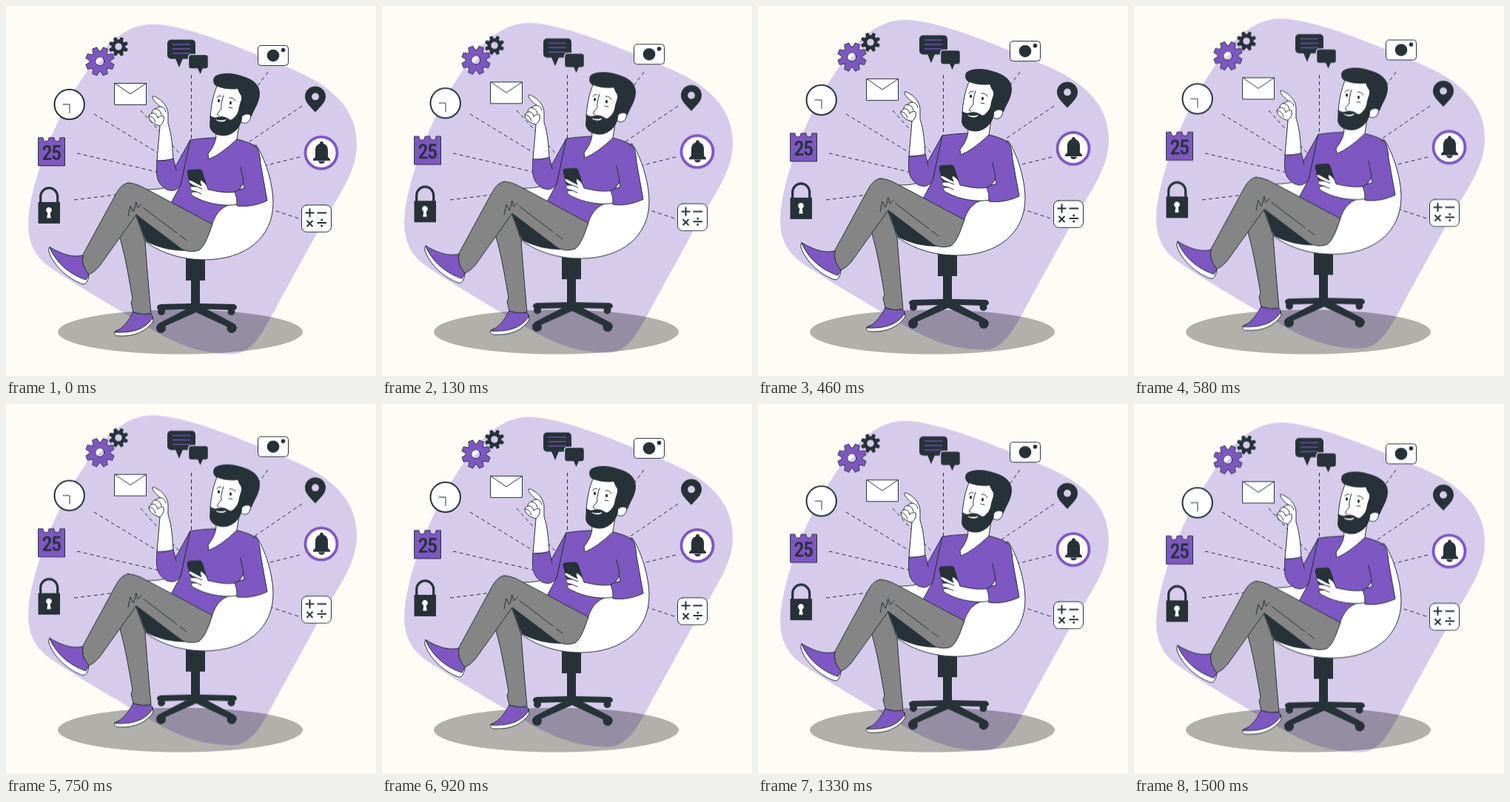
Recreate the animation shown at these times as an HTML page without scripts. Size 500 by 500 pixels, loop 1.54 s.

```html
<!DOCTYPE html>
<html lang="en">
<head>
<meta charset="utf-8">
<title>Relaxed multitasking</title>
<style>
  :root { --ink: #263238; --purple: #7e57c2; --lilac: #d6cbeb; --grey: #858585; }
  html, body { margin: 0; width: 100%; height: 100%; overflow: hidden; background: #fffcf5; }
  svg { display: block; width: 100%; height: 100%; }
  .float { animation: float 1540ms linear -35ms infinite; }
  @keyframes float {
    0%, 100% { transform: translateY(.4px); }
    50% { transform: translateY(-9.6px); }
  }
  .line { stroke: var(--ink); stroke-width: 1; stroke-linejoin: round; stroke-linecap: round; }
  .ink { fill: var(--ink); }
  .purple { fill: var(--purple); }
  .lilac { fill: var(--lilac); }
  .grey { fill: var(--grey); }
  .white { fill: #fff; }
  .none { fill: none; }
  .dashes { fill: none; stroke: var(--ink); stroke-width: 1; stroke-dasharray: 5 4; }
  .date { font: 500 28px "Roboto Condensed", Roboto, sans-serif; letter-spacing: -1.5px; text-anchor: middle; }
</style>
</head>
<body>
<svg viewBox="0 0 500 500">
  <defs>
    <g id="gear">
      <circle r="13.5"/>
      <g id="teeth"><path d="M-4 -13L-2.900 -19H2.900L4 -13V13L2.900 19H-2.900L-4 13Z"/><path d="M-13 -4L-19 -2.900V2.900L-13 4H13L19 2.900V-2.900L13 -4Z"/></g>
      <use href="#teeth" transform="rotate(45)"/>
    </g>
  </defs>

  <path class="float lilac" d="M200 24.500C250 27 325 60 378 82C445 108 474 142 474 187C474 225 450 255 424 300L370 398C350 435 335 471 305 470.500C270 470 240 462 200 439C150 409 95 378 58 352C36 336 30 315 30 295C30 250 60 170 88 122C120 70 150 24.500 200 24.500Z"/>

  <path class="dashes" d="M250.500 93V185M354 89L330 122M400 135L325 186M397 204L345 217M395 287L350 272M119 146L206 199M96 199L212 226M92 262L165 253M182 141L237 202"/>

  <ellipse cx="235.500" cy="440.500" rx="165.500" ry="30" opacity=".3"/>

  <g class="float">
    <!-- chair -->
    <g class="ink">
      <path d="M243 341H269V371H262V402L308 403Q312 404 312 408Q311 411 306 411L272 410L304 427Q312 430 312 436L302 435L257 414L212 434L203 436Q203 430 210 427L243 410L209 411Q204 411 204 407Q204 404 209 403L250 402V371H243Z"/>
      <circle cx="209.500" cy="435.500" r="6.500"/><circle cx="305" cy="435.500" r="6.500"/>
      <circle cx="210" cy="413" r="5"/><circle cx="304.500" cy="413" r="5"/>
    </g>
    <path class="white line" d="M338 188C350 205 361 240 361 266C361 312 325 343 268 343C235 343 205 332 187 317L176 248C215 249 223 245 238 232Z"/>

    <!-- back leg -->
    <path class="ink" d="M175 281L189 318C205 327 225 331 242 331Z"/>
    <path class="grey line" d="M175 283L152 307C160 333 164 355 171 396L169 401L172 414Q183 418 196 416C193 382 190 348 188 318Z"/>
    <path class="white line" d="M147 440C145 444 148 446 153 446C175 447 190 439 199 426L198 419Z"/>
    <path class="purple line" d="M172 414Q183 418 195 416Q199 418 198 422C188 436 174 442 147 441C159 435 165 426 172 414Z"/>

    <!-- torso -->
    <path class="purple line" d="M249 181Q262 179 281 178L312 180Q329 184 338 190L345 230L321 238L320 266L311 267C293 269 284 278 278 297L221 270L236 242Z"/>

    <!-- front leg -->
    <path class="grey line" d="M165 239C156 241 152 248 148 255L104 336Q101 351 112 363Q119 360 126 352L176 282L238 329Q250 334 261 330C270 323 274 308 279 295C245 277 210 258 181 243Q171 239 165 239Z"/>
    <path class="none line" d="M165 284L168 270L172 278C176 271 174 265 176 265L178 273L183 268M186 273L231 307M235 310L244 317"/>
    <path class="white line" d="M59 326Q57 327 58 332C64 351 85 370 104 376Q110 377 112 364Z"/>
    <path class="purple line" d="M59 326C72 333 87 341 104 337Q101 350 112 363L108 370C89 364 68 349 59 326Z"/>

    <!-- pointing arm -->
    <path class="white line" d="M204 209L208 162C199 160 193 154 193 149Q194 146 197 145Q197 140 202 139Q205 136 209 136C202 131 197 125 198 122Q200 121 204 124C212 128 219 137 219 146L219 159C224 174 225 190 226 207Z"/>
    <path class="none line" d="M197 145Q203 143 205 151M202 139Q209 140 210 147M193 149Q199 148 202 157M209 136Q215 137 216 143M205 151Q210 147 213 149Q215 156 208 162"/>
    <path class="purple line" d="M204 209Q216 210 226 206L229 217L249 181L236 242Q229 253 217 248C202 239 203 227 204 209Z"/>
    <path class="none line" d="M229 217L230 222"/>

    <!-- phone arm -->
    <path class="ink line" d="M247 222L261 221Q264 221 265 224L271 243L265 247L249 242L245 225Q245 223 247 222Z"/>
    <path class="white line" d="M312 251C298 254 283 250 273 248Q271 239 263 235Q261 238 264 243L251 236Q246 234 247 238Q251 242 257 244L250 244Q247 246 250 249L257 251Q249 251 250 254Q253 258 259 260C270 266 295 272 313 268Z"/>
    <path class="none line" d="M257 244L265 247M257 251L264 254"/>
    <path class="purple line" d="M338 190Q343 195 344 213L353 263C340 269 326 272 312 270Q313 260 309 251Q320 248 321 237L317 218L320 192Z"/>
    <path class="purple" d="M312 182L337 191L325 215L318 218L305 205Z"/>
    <path class="white line" d="M315 248L321 240L322 246Z"/>

    <!-- head -->
    <path class="white line" d="M284 172Q285 185 273 200L274 207Q290 201 312 180L316 154Z"/>
    <path class="white line" d="M286 106C279 122 277 137 276 151L285 168L311 163L321 140L317 112Z"/>
    <path class="ink" d="M286 109C279 107 278 97 284 94C291 90 306 90 317 94C333 98 343 106 343 118C343 130 336 138 332 149L320 150C317 162 312 171 299 175C286 177 276 171 275 162L276 148Q281 152 286 150Q294 148 300 152Q304 156 308 151Q314 146 315 136L319 123Q315 118 313 112Q300 114 286 109Z"/>
    <path class="white line" d="M319 149Q324 144 330 147Q332 152 327 157Q323 160 318 157Z"/>
    <path class="white" d="M283 153Q290 156 298 153Q296 156.500 291 156.500Q285 156 283 153Z"/>
    <path class="none line" d="M294 121Q290 132 291 139L286 145Q284 148 288 148M285 124Q287 120 291 122M302 124Q307 123 310 128M301 137L306 138"/>
    <ellipse class="ink" cx="287.500" cy="128" rx="1.600" ry="2.300"/>
    <ellipse class="ink" cx="303.500" cy="131" rx="1.600" ry="2.300"/>

    <!-- gears -->
    <g transform="translate(127 75)">
      <g transform="rotate(22.500)">
        <use href="#gear" class="purple line" style="stroke-width:1.6"/>
        <use href="#gear" class="purple"/>
      </g>
      <circle class="lilac line" r="5.800"/>
      <path class="white" d="M-4 4A5.500 5.500 0 0 1 4-4Z"/>
    </g>
    <use href="#gear" class="ink" transform="translate(152 55) rotate(22.500) scale(.69)"/>
    <circle class="lilac" cx="152" cy="55" r="4.700"/>

    <!-- chat -->
    <rect class="ink" x="218" y="45.500" width="38" height="26" rx="5"/>
    <path class="ink" d="M229 71L234 83L239 71Z"/>
    <path class="none" stroke="#7e57c2" stroke-width="1.200" d="M225 52H249M225 58H249M225 64H249"/>
    <rect class="ink" x="246.500" y="65.500" width="27" height="19.500" rx="4" stroke="#d6cbeb" stroke-width="1.500"/>
    <path class="ink" d="M259 84L262.500 92L266 84Z"/>

    <!-- camera -->
    <rect class="white line" x="340.500" y="53.500" width="41" height="27" rx="4"/>
    <circle class="ink" cx="361" cy="67" r="8.300"/><circle class="ink" cx="374.500" cy="59.500" r="2.800"/>

    <!-- pin -->
    <path class="ink" d="M418 143.500C411 136 404 130 404 122.500A14 14 0 0 1 432 122.500C432 130 425 136 418 143.500Z"/>
    <circle class="lilac" cx="418" cy="122.500" r="4.900"/>

    <!-- bell -->
    <circle class="white" cx="426" cy="198.500" r="21.500" stroke="#7e57c2" stroke-width="3.800"/>
    <path class="ink" d="M424 186Q424 183 426.500 183Q429 183 429 186Q435 188 435 195V204L438 207V209H415V207L418 204V195Q418 188 424 186ZM422 209.500H431Q430 213 426.500 213Q423 213 422 209.500Z"/>

    <!-- calculator -->
    <rect class="white line" x="399.500" y="269" width="40" height="36.500" rx="7"/>
    <path class="none" stroke="#263238" stroke-width="2" d="M404.500 279.500H416.500M410.500 273.500V285.500M420.500 279.500H433M406.500 290L414.500 298M414.500 290L406.500 298M420.500 293H433"/>
    <circle class="ink" cx="426.700" cy="289" r="1.500"/><circle class="ink" cx="426.700" cy="297" r="1.500"/>

    <!-- clock -->
    <circle class="white" cx="85.700" cy="133" r="20.200" stroke="#263238" stroke-width="2"/>
    <path class="none line" d="M77 133H86V144.500"/>

    <!-- envelope -->
    <rect class="white line" x="147" y="104.500" width="42.500" height="29"/>
    <path class="none line" d="M147 104.500L168 119L189.500 104.500"/>

    <!-- calendar -->
    <path class="purple line" d="M44 178H50Q50 183 54 183Q58 183 58 178H65Q65 183 69 183Q73 183 73 178H79.500V216H44Z"/>
    <text class="ink date" x="61" y="208.500">25</text>

    <!-- padlock -->
    <path class="none" stroke="#263238" stroke-width="3.200" d="M46.700 268V257.500A11.500 11.500 0 0 1 69.700 257.500V268"/>
    <rect class="ink" x="43.500" y="265" width="29.500" height="29"/>
    <path class="white" d="M56.300 279.500A3.900 3.900 0 1 1 59.700 279.500L60.700 286.500H55.300Z"/>
  </g>
</svg>
</body>
</html>
```
